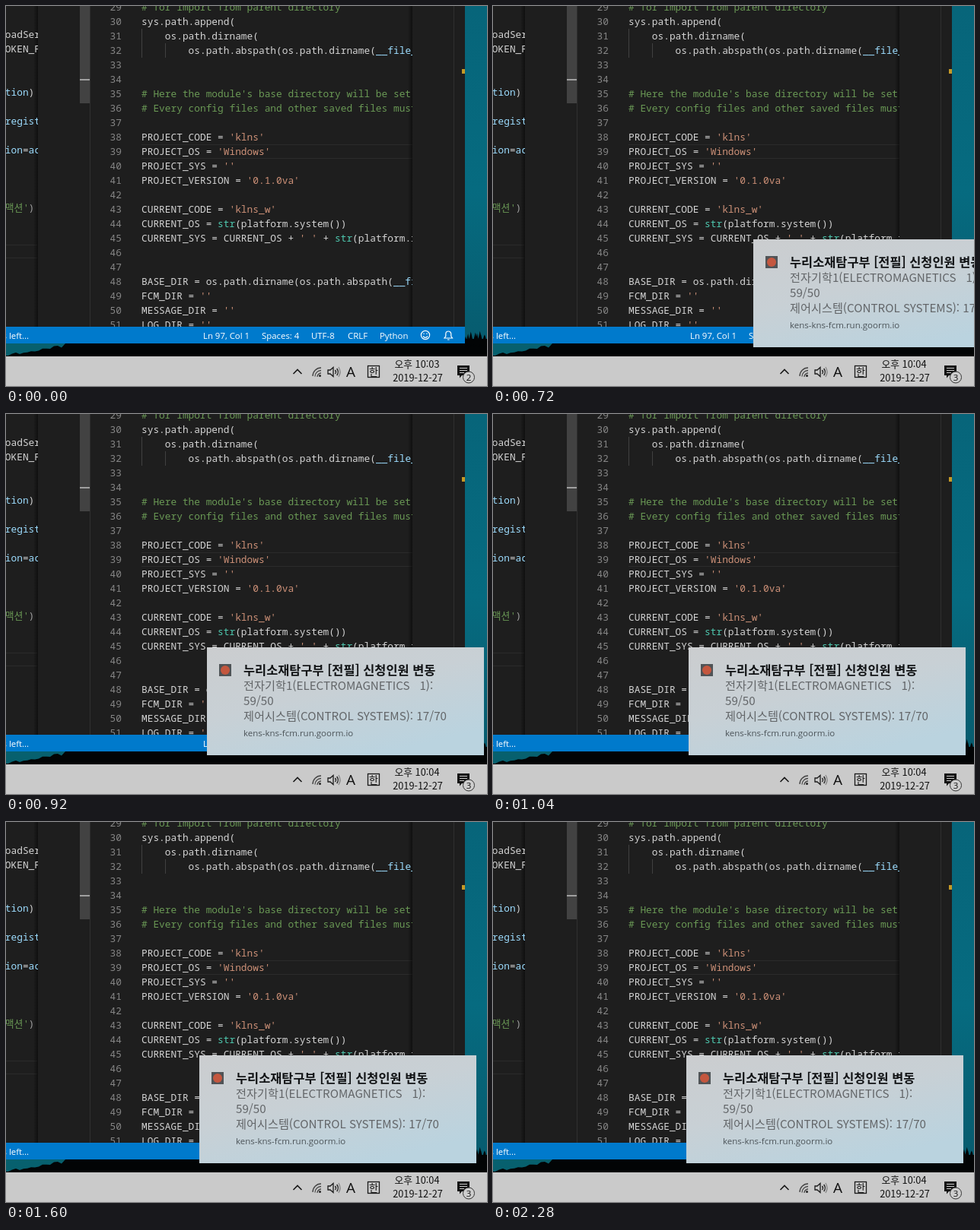
Recreate the animation shown at these times as an HTML page. Size 632 by 500 pixels, loop 2.32 s.

```html
<!DOCTYPE html>
<html lang="ko">
<head>
<meta charset="utf-8">
<style>
  html, body { margin: 0; width: 100%; height: 100%; overflow: hidden; background: #000; }
  svg { display: block; width: 632px; height: 500px; }
  text { white-space: pre; }
  .code { font: 500 12.833px "Noto Sans Mono", "Noto Sans CJK KR", monospace; fill: #d4d4d4; }
  .ui { font: 11.4px "Open Sans", "Noto Sans", sans-serif; fill: #fff; }
  .kr { font: 15.2px "Noto Sans CJK KR", "Noto Sans CJK", sans-serif; fill: #626568; }
  .title { font-weight: 700; font-size: 16.4px; fill: #101214; }
  .clock { font-size: 12.8px; fill: #111; text-anchor: middle; }
</style>
</head>
<body>
<svg viewBox="0 0 632 500">
  <defs>
    <linearGradient id="sea" x1="0" y1="0" x2="0" y2="1">
      <stop offset="0" stop-color="#07657a"/>
      <stop offset=".55" stop-color="#066b80"/>
      <stop offset="1" stop-color="#075c6f"/>
    </linearGradient>
    <linearGradient id="glass" x1="0" y1="0" x2=".6" y2="1">
      <stop offset="0" stop-color="#cbcdcf"/>
      <stop offset=".5" stop-color="#c8d0d5"/>
      <stop offset="1" stop-color="#bad3df"/>
    </linearGradient>
    <linearGradient id="shade">
      <stop offset="0" stop-color="#000" stop-opacity="0"/>
      <stop offset="1" stop-color="#000" stop-opacity=".5"/>
    </linearGradient>
    <clipPath id="leftClip"><rect width="42" height="422"/></clipPath>
    <clipPath id="codeClip"><rect x="111" width="423" height="422"/></clipPath>
  </defs>

  <rect width="632" height="500" fill="#020405"/>
  <rect x="603" width="29" height="438" fill="url(#sea)"/>
  <path id="shore" fill="#07606e"/>
  <path id="grass" fill="#020405"/>

  <rect width="603" height="422" fill="#1e1e1e"/>
  <path d="M0 314.5H41M0 331.5H41M178 182.5H534M178 200.5H534" stroke="#2b2b2b"/>
  <rect x="36" width="6" height="422" fill="url(#shade)"/>
  <rect x="528" width="6" height="422" fill="url(#shade)"/>
  <path d="M110.5 0V422M588.5 0V422" stroke="#303030"/>
  <rect x="97" width="13" height="128" fill="#424242"/>
  <rect x="97" y="96" width="13" height="2" fill="#a0a0a0"/>
  <rect x="599" y="83" width="4" height="6" fill="#c69a26"/>
  <path d="M178.5 30V68M209.5 49V68" stroke="#404040"/>
  <g id="left" class="code" clip-path="url(#leftClip)"></g>
  <g id="code" class="code" clip-path="url(#codeClip)"></g>

  <rect y="422" width="603" height="22" fill="#007acc"/>
  <g id="status" class="ui"></g>
  <g fill="none" stroke="#fff" stroke-width="1.2">
    <circle cx="551" cy="433" r="5.6"/>
    <path d="M548 434.5q3 3.6 6 0M549 430.5v1.6M553 430.5v1.6"/>
    <path d="M576 437h10.5l-1.7-2.5v-3a3.5 3.5 0 0 0-7 0v3zM580 439h2.6"/>
  </g>

  <rect y="461" width="632" height="39" fill="#cacaca"/>
  <g fill="none" stroke="#1a1a1a" stroke-width="1.3">
    <path d="M377.5 484l5.5-5.5 5.5 5.5" stroke-width="1.6"/>
    <path d="M403 487a11 11 0 0 1 11-11M406 487.5a8 8 0 0 1 8-8M409 488a5 5 0 0 1 5-5" stroke="#444"/>
    <path d="M423 479h3l4-3.5v12l-4-3.5h-3zM432.5 479q2 2.5 0 5M434.7 477q3.3 4.5 0 9"/>
    <path d="M437 475q4 6.5 0 13" stroke="#888"/>
    <rect x="475.5" y="473.5" width="15" height="15"/>
  </g>
  <circle cx="412.5" cy="486.5" r="1.5" fill="#222"/>
  <text class="ui" x="447" y="488" style="font-size:19px;fill:#111">A</text>
  <text class="kr" x="483" y="486" style="font-size:13px;fill:#111;text-anchor:middle">한</text>
  <text id="time" class="kr clock" x="540" y="476"></text>
  <text class="kr clock" x="541" y="494">2019-12-27</text>
  <path d="M593 473h16v13h-10l-3 3.5v-3.5h-3z" fill="#111"/>
  <path d="M596 476.5h10M596 479.5h10M596 482.5h6" stroke="#cacaca"/>
  <circle cx="608" cy="488.5" r="7.5" fill="#cecece" stroke="#333"/>
  <text id="badge" class="ui" x="608" y="492.7" style="font-size:11.5px;fill:#111;text-anchor:middle"></text>

  <g id="toast">
    <rect x="254" y="307" width="364" height="142" fill="url(#glass)"/>
    <rect x="270" y="329" width="16" height="16" fill="#505457"/>
    <circle cx="278" cy="337" r="6" fill="#c4573f"/>
    <text class="kr title" x="302" y="343">누리소재탐구부 [전필] 신청인원 변동</text>
    <text class="kr" x="302" y="362.5">전자기학1(ELECTROMAGNETICS   1):</text>
    <text class="kr" x="302" y="382.5">59/50</text>
    <text class="kr" x="302" y="402.5">제어시스템(CONTROL SYSTEMS): 17/70</text>
    <text class="ui" x="302" y="424" style="font-size:11.5px;fill:#4c5459">kens-kns-fcm.run.goorm.io</text>
  </g>
</svg>
<script>
const LOOP = 2320, STEP = 40, BADGE_AT = 600, TOAST_AT = 680;
const CHAR = 7.7, ROW = 19, FIRST_LINE = 29;
const $ = id => document.getElementById(id);

function add(parent, tag, attrs, content = '') {
  const el = document.createElementNS('http://www.w3.org/2000/svg', tag);
  for (const key in attrs) el.setAttribute(key, attrs[key]);
  el.textContent = content;
  return parent.appendChild(el);
}

function tokenColor(token) {
  if (token[0] === '#') return '#6a9955';
  if (token[0] === "'") return '#ce9178';
  if (token === 'str') return '#4ec9b0';
  if (token.startsWith('__')) return '#9cdcfe';
  return '#d4d4d4';
}

const source = `# for import from parent directory
sys.path.append(
    os.path.dirname(
        os.path.abspath(os.path.dirname(__file__))))


# Here the module's base directory will be set
# Every config files and other saved files must

PROJECT_CODE = 'klns'
PROJECT_OS = 'Windows'
PROJECT_SYS = ''
PROJECT_VERSION = '0.1.0va'

CURRENT_CODE = 'klns_w'
CURRENT_OS = str(platform.system())
CURRENT_SYS = CURRENT_OS + ' ' + str(platform.release())


BASE_DIR = os.path.dirname(os.path.abspath(__file__))
FCM_DIR = ''
MESSAGE_DIR = ''
LOG_DIR = ''`;

source.split('\n').forEach((line, i) => {
  const y = 6 + i * ROW, body = line.trimStart();
  add($('code'), 'text', { x: 136.5, y, fill: '#858585' }, FIRST_LINE + i);
  const row = add($('code'), 'text', { x: 178 + (line.length - body.length) * CHAR, y });
  body.split(/(#.*|'[^']*'|\bstr\b|__file__)/).filter(Boolean)
    .forEach(token => add(row, 'tspan', { fill: tokenColor(token) }, token));
});

// Column, baseline, text and colour of the pieces in the left pane.
[
  [0, 42, 'oadSer', '#d4d4d4'], [0, 61, 'OKEN_FI', '#d4d4d4'],
  [0, 118, 'tion', '#9cdcfe'], [4, 118, ')', '#d4d4d4'],
  [0, 156, 'regist', '#9cdcfe'],
  [0, 194, 'ion', '#9cdcfe'], [3, 194, '=', '#d4d4d4'], [4, 194, 'ac', '#9cdcfe'],
  [0, 270, "맥션'", '#6a9955'], [4, 270, ')', '#a0a0a0']
].forEach(([column, y, label, fill]) =>
  add($('left'), 'text', { x: column * CHAR - 1.2, y, fill }, label));

[
  [-4.5, 's left...'], [259, 'Ln 97, Col 1'], [336, 'Spaces: 4'],
  [401, 'UTF-8'], [449, 'CRLF'], [491, 'Python']
].forEach(([x, label]) => add($('status'), 'text', { x, y: 437.5 }, label));

// Ragged shoreline and grass, seeded so every load looks alike.
let seed = 7;
const random = () => (seed = seed * 16807 % 2147483647) / 2147483647;
let shore = 'M0 444H82', grass = '';
for (let x = 78; x > 0; x -= 5) shore += `L${x} ${460 - x / 6 + random() * 5 - 3}`;
for (let x = 601; x < 632; x += 3) grass += `M${x} 445l${1 + random() * 3} ${-10 - random() * 8}l4 18z`;
$('shore').setAttribute('d', shore + 'L0 460z');
$('grass').setAttribute('d', grass);

function draw(ms) {
  const t = Math.floor(ms % LOOP / STEP) * STEP;
  const shown = t >= TOAST_AT;
  const offset = Math.round(37 * Math.exp((800 - t) / 92));
  $('badge').textContent = t < BADGE_AT ? 2 : 3;
  $('time').textContent = shown ? '오후 10:04' : '오후 10:03';
  $('toast').setAttribute('visibility', shown ? 'visible' : 'hidden');
  $('toast').setAttribute('transform', `translate(${offset} 0)`);
}

const start = performance.now();
function tick() {
  draw(performance.now() - start);
  requestAnimationFrame(tick);
}
draw(0);
requestAnimationFrame(tick);
</script>
</body>
</html>
```
